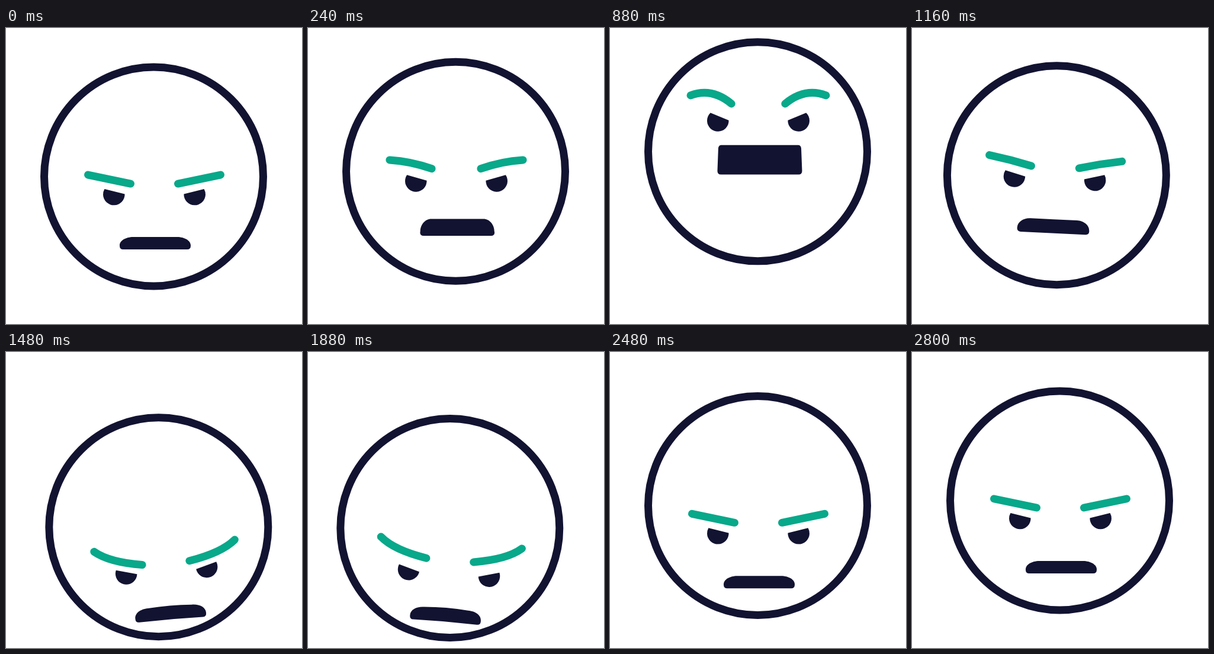
These frames come from a looping animation (500x500 px, 2840 ms). An HTML page with a canvas:

```html
<!DOCTYPE html>
<html>
<head>
<meta charset="utf-8">
<style>
  html, body { margin: 0; width: 100%; height: 100%; overflow: hidden; background: #fff; }
  canvas { display: block; }
</style>
</head>
<body>
<canvas id="stage" width="500" height="500"></canvas>
<script>
const ctx = document.getElementById('stage').getContext('2d');
const LOOP = 2840, NAVY = '#121331', TEAL = '#08a88a', DEG = Math.PI / 180;

// Eased progress from 0 to 1 between two times
function glide(t, from, to) {
  const x = Math.min(1, Math.max(0, (t - from) / (to - from)));
  return x * x * (3 - 2 * x);
}

function drawBrow(up, low, lift) {
  ctx.beginPath();
  ctx.moveTo(-112 - 2.5 * up - 7.5 * low, lift - 3 - 10 * up - 9 * low);
  ctx.quadraticCurveTo(
    -76 - 3 * up - 20 * low, lift + 4.5 - 32 * up + 4 * low,
    -40 - 5.5 * up, lift + 12 - 11 * up + 5.6 * low);
  ctx.strokeStyle = TEAL;
  ctx.stroke();
}

// A disc with its top cut off along a tilted line
function drawEye(up, low) {
  const r = 18.3, tilt = (14 + 9 * up + 1.5 * low) * DEG;
  const open = Math.asin((5 + 2.5 * up - 2.5 * low) / r);
  ctx.beginPath();
  ctx.arc(-68.2, 30, r, tilt - open, tilt + Math.PI + open);
  ctx.fill();
}

function drawMouth(up, low) {
  const half = 60 + 12 * up, shoulder = half - 1.5 * up, bend = 1.5 * low;
  const top = 102 - 32 * up - 12.5 * low, base = 123 - 2 * up - 9.5 * low;
  const rx = 23 - 19 * up, ry = Math.min(base - top - 7, 35 - 30 * up), k = .45;
  ctx.save();
  ctx.translate(1.5 + up - low, 0);
  ctx.beginPath();
  ctx.moveTo(6 - half, base);
  ctx.quadraticCurveTo(-half, base, -half, base - 6);
  ctx.lineTo(-shoulder, top + ry);
  ctx.bezierCurveTo(-shoulder, top + ry * k, rx * k - shoulder, top + bend, rx - shoulder, top + bend);
  ctx.quadraticCurveTo(0, top - bend, shoulder - rx, top + bend);
  ctx.bezierCurveTo(shoulder - rx * k, top + bend, shoulder, top + ry * k, shoulder, top + ry);
  ctx.lineTo(half, base - 6);
  ctx.quadraticCurveTo(half, base, half - 6, base);
  ctx.quadraticCurveTo(0, base - bend, 6 - half, base);
  ctx.fill();
  ctx.restore();
}

function draw(t) {
  const dip = glide(t, 0, 80), rise = glide(t, 80, 470), slam = glide(t, 820, 1540);
  const recover = glide(t, 2240, 2630), settle = glide(t, 2630, 2800), relax = glide(t, 2240, 2480);

  const headY = 251 + 12 * dip - 56 * rise + 90.5 * slam - 56.5 * recover + 10 * settle;
  const faceY = 251 + 40 * dip - 169 * rise + 221 * slam - 99 * recover + 7 * settle;
  const browLift = 9 * relax - 9 * glide(t, 1480, 1880);

  // 1 = shouting upwards, 0 = rest, -1 = scowling downwards
  const mood = -.2 * dip + 1.2 * rise - 2 * slam + relax;
  const up = Math.max(0, mood), low = Math.max(0, -mood);
  const shaking = t > 1120 && t < 2240;
  const shake = shaking ? -Math.sin((t - 1120) / 280 * Math.PI) : 0;

  ctx.fillStyle = '#fff';
  ctx.fillRect(0, 0, 500, 500);
  ctx.fillStyle = ctx.strokeStyle = NAVY;
  ctx.lineWidth = 13;
  ctx.lineCap = 'round';
  ctx.beginPath();
  ctx.arc(249.5 + 11.5 * shake - .8 * low, headY, 185, 0, 2 * Math.PI);
  ctx.stroke();

  ctx.save();
  ctx.translate(250.5 + 18 * shake + 4 * low, faceY);
  ctx.rotate(-6.2 * shake * DEG);
  drawMouth(up, low);
  for (const side of [1, -1]) {
    ctx.save();
    ctx.scale(side, 1);
    drawBrow(up, low, browLift);
    drawEye(up, low);
    ctx.restore();
  }
  ctx.restore();
}

const start = performance.now();
function tick() {
  draw((performance.now() - start) % LOOP);
  requestAnimationFrame(tick);
}
tick();
</script>
</body>
</html>
```
